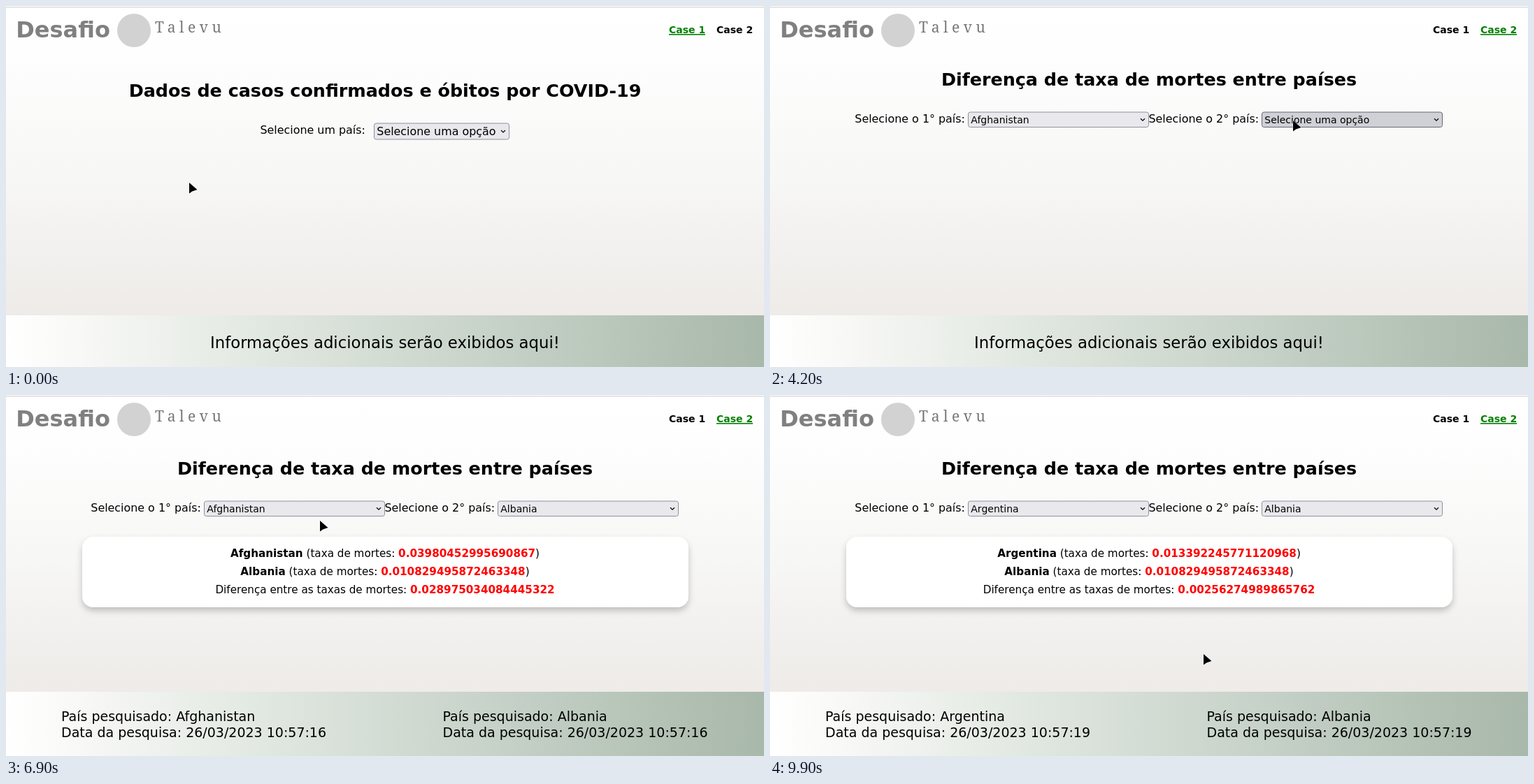
Write an HTML page that moves like this. It is 1084x517 px and loops after 10 s.

```html
<!DOCTYPE html>
<html lang="pt-BR">
<head>
<meta charset="utf-8">
<title>Desafio</title>
<style>
  html, body { margin: 0; width: 100%; height: 100%; overflow: hidden; background: #fff; }
  svg { display: block; width: 1084px; height: 517px; font-family: "DejaVu Sans", sans-serif; }
  text { white-space: pre; }
  .bold { font-weight: bold; }
  .mid { text-anchor: middle; }
  .rate { font-weight: bold; fill: #f00; }
  .title { font-weight: bold; font-size: 25.4px; text-anchor: middle; }
  .card text { font-size: 15.2px; text-anchor: middle; }
  .info { font-size: 19px; }
</style>
</head>
<body>
<svg id="stage" viewBox="0 0 1084 517">
  <defs>
    <linearGradient id="page" x1="0" y1="0" x2="0" y2="1">
      <stop offset="0" stop-color="#fff"/>
      <stop offset=".15" stop-color="#fefefe"/>
      <stop offset=".55" stop-color="#f7f7f6"/>
      <stop offset="1" stop-color="#eeebe8"/>
    </linearGradient>
    <linearGradient id="strip">
      <stop offset="0" stop-color="#fff"/>
      <stop offset=".1" stop-color="#f8f8f6"/>
      <stop offset=".35" stop-color="#e0e7e0"/>
      <stop offset="1" stop-color="#a8b8aa"/>
    </linearGradient>
    <filter id="soft" x="-10%" y="-30%" width="120%" height="180%">
      <feDropShadow dx="0" dy="5" stdDeviation="5" flood-color="#000" flood-opacity=".22"/>
    </filter>
  </defs>

  <rect id="main" width="1084" height="443" fill="url(#page)"/>
  <rect y="1" width="1084" height="1.5" fill="#dcdcdc"/>
  <text x="14.3" y="45" class="bold" font-size="32" fill="#808080">Desafio</text>
  <circle cx="183" cy="35" r="24" fill="#d2d2d2"/>
  <text x="213" y="38" font-size="21" letter-spacing="5.5" fill="#777" font-family="Noto Serif, serif">Talevu</text>
  <g class="bold" font-size="14">
    <text id="nav1" x="948" y="39">Case 1</text>
    <text id="nav2" x="1016" y="39">Case 2</text>
    <rect id="line" y="40" width="52" height="1.6" fill="green"/>
  </g>

  <g id="case1">
    <text class="title" x="542" y="130">Dados de casos confirmados e óbitos por COVID-19</text>
    <text x="363.5" y="183" font-size="15.9">Selecione um país:</text>
  </g>
  <g id="case2">
    <text class="title" x="542" y="114">Diferença de taxa de mortes entre países</text>
    <text x="121.3" y="167" font-size="15.9">Selecione o 1° país:</text>
    <text x="541.5" y="167" font-size="15.9">Selecione o 2° país:</text>
  </g>

  <g id="card" class="card">
    <rect x="109" y="203" width="867" height="101" rx="16" fill="#fff" filter="url(#soft)"/>
    <text x="542" y="232"><tspan id="name1" class="bold"></tspan> (taxa de mortes: <tspan id="rate1" class="rate"></tspan>)</text>
    <text x="542" y="258"><tspan class="bold">Albania</tspan> (taxa de mortes: <tspan class="rate">0.010829495872463348</tspan>)</text>
    <text x="542" y="284">Diferença entre as taxas de mortes: <tspan id="diff" class="rate"></tspan></text>
  </g>

  <rect id="foot" width="1084" height="92" fill="url(#strip)"/>
  <text id="hint" class="mid" x="542" y="490" font-size="22.8">Informações adicionais serão exibidos aqui!</text>
  <g id="info" class="info">
    <text id="land1" x="79" y="467"></text>
    <text id="date1" x="79" y="490"></text>
    <text x="624.5" y="467">País pesquisado: Albania</text>
    <text id="date2" x="624.5" y="490"></text>
  </g>

  <g id="boxes"></g>
  <g id="list"></g>
  <path id="arrow" d="M0 0V15.5L4.2 12.4L11.5 10Z" stroke="#fff" stroke-width="1" paint-order="stroke"/>
  <path id="beam" d="M-3 -7H-1L0 -6L1 -7H3M0 -6V5M-3 6H-1L0 5L1 6H3" fill="none" stroke="#000" stroke-width="1.4"/>
</svg>
<script>
const NS = "http://www.w3.org/2000/svg";
const $ = id => document.getElementById(id);
const show = (id, on) => $(id).setAttribute("display", on ? "inline" : "none");

function add(parent, tag, attrs, text = "") {
  const node = document.createElementNS(NS, tag);
  for (const key in attrs) node.setAttribute(key, attrs[key]);
  node.textContent = text;
  parent.appendChild(node);
  return node;
}

const EMPTY = "Selecione uma opção";
const LANDS = [EMPTY, "Afghanistan", "Albania", "Algeria", "Andorra", "Angola", "Antarctica",
  "Antigua and Barbuda", "Argentina", "Armenia", "Australia", "Austria", "Azerbaijan",
  "Bahamas", "Bahrain"];
const LOOP = 10000, STEP = 100, LIST_TOP = 174, ROW = 25;

function makeBox(x, y, w, h, size, base) {
  const g = add($("boxes"), "g", {});
  const rect = add(g, "rect", { x: x + .5, y: y + .5, width: w - 1, height: h - 1, rx: 3 });
  const label = add(g, "text", { x: x + 4.3, y: base, "font-size": size });
  const cx = x + w - 9, cy = y + h / 2;
  add(g, "path", { d: `M${cx - 3} ${cy - 1.5}l3 3l3 -3`, fill: "none", stroke: "#000", "stroke-width": 1.2 });
  return { g, x, y, w, h, rect, label };
}

function drawBox(box, on, value, hover) {
  box.g.setAttribute("display", on ? "inline" : "none");
  box.rect.setAttribute("fill", hover ? "#d0d0d7" : "#e9e9ed");
  box.rect.setAttribute("stroke", hover ? "#676774" : "#8f8f9d");
  box.label.textContent = value;
}

const single = makeBox(526, 167.5, 194, 24, 15.9, 185);
const first = makeBox(283, 151.5, 259, 22.5, 14, 168);
const second = makeBox(703, 151.5, 259, 22.5, 14, 168);

const listFrame = add($("list"), "rect", { y: LIST_TOP, width: 259, height: 360, fill: "#fff", stroke: "#c4c4cc" });
const rows = LANDS.slice(1).map((_, i) => {
  const y = LIST_TOP + i * ROW;
  return {
    rect: add($("list"), "rect", { y, width: 257, height: ROW, fill: "#3584e4" }),
    label: add($("list"), "text", { y: y + 17.5, "font-size": 14 })
  };
});

function drawList(box, names, active) {
  listFrame.setAttribute("x", box.x);
  rows.forEach(({ rect, label }, i) => {
    rect.setAttribute("x", box.x + 1);
    rect.setAttribute("fill-opacity", i === active ? 1 : 0);
    label.setAttribute("x", box.x + 6);
    label.setAttribute("fill", i === active ? "#fff" : "#000");
    label.textContent = names[i] || "";
  });
}

// pointer stops: time, x, y
const PATH = [
  [0, 262, 253], [1100, 1040, 32], [1200, 1040, 32], [1800, 726, 141], [2000, 726, 141],
  [2100, 715, 166], [2200, 440, 164], [2800, 440, 164], [3300, 421, 207], [3700, 421, 207],
  [4200, 748, 164], [4700, 748, 165], [5100, 743, 207], [5300, 743, 207], [5700, 663, 234],
  [6400, 952, 310], [6900, 449, 180], [7100, 449, 164], [7500, 449, 164], [8200, 448, 365],
  [8500, 448, 365], [9200, 571, 388], [9500, 571, 388], [9900, 620, 371], [LOOP, 620, 371]
];

function pointer(t) {
  const i = PATH.findIndex(p => p[0] > t);
  const [t0, x0, y0] = PATH[i - 1], [t1, x1, y1] = PATH[i];
  const k = (t - t0) / (t1 - t0);
  return { x: x0 + (x1 - x0) * k, y: y0 + (y1 - y0) * k };
}

function paint(now) {
  const t = Math.floor(now % LOOP / STEP) * STEP;
  const within = (a, b) => t >= a && t < b;
  const p = pointer(t);
  const over = b => p.x >= b.x && p.x < b.x + b.w && p.y >= b.y && p.y < b.y + b.h;

  const compare = t >= 1300, found = t >= 5500, fresh = t >= 8900;
  const land1 = t < 3500 ? EMPTY : t < 8500 ? "Afghanistan" : "Argentina";
  const land2 = t < 5400 ? EMPTY : "Albania";

  show("case1", !compare);
  show("case2", compare);
  $("nav1").setAttribute("fill", compare ? "#000" : "green");
  $("nav2").setAttribute("fill", compare ? "green" : "#000");
  $("line").setAttribute("x", compare ? 1016 : 948);

  const footTop = found ? 425 : 443;
  $("main").setAttribute("height", footTop);
  $("foot").setAttribute("y", footTop);
  show("hint", !found);
  show("info", found);
  $("land1").textContent = "País pesquisado: " + land1;
  $("date1").textContent = $("date2").textContent =
    "Data da pesquisa: 26/03/2023 10:57:" + (fresh ? 19 : 16);

  show("card", t >= 6200);
  $("name1").textContent = land1;
  $("rate1").textContent = fresh ? "0.013392245771120968" : "0.03980452995690867";
  $("diff").textContent = fresh ? "0.00256274989865762" : "0.028975034084445322";

  const open1 = within(2700, 3500) || within(7300, 8500), open2 = within(4600, 5400);
  drawBox(single, !compare, EMPTY, over(single));
  drawBox(first, compare, land1, over(first) || open1);
  drawBox(second, compare, land2, over(second) || open2);

  show("list", open1 || open2);
  if (open1 || open2) {
    const taken = open2 ? land1 : land2;
    const names = LANDS.filter(n => n === EMPTY || n !== taken);
    const chosen = names.indexOf(open2 ? land2 : land1);
    const row = Math.floor((p.y - LIST_TOP) / ROW);
    drawList(open2 ? second : first, names, row < 0 ? chosen : row);
  }

  const typing = within(5600, 5900);
  show("arrow", !typing);
  show("beam", typing);
  for (const id of ["arrow", "beam"]) $(id).setAttribute("transform", `translate(${p.x} ${p.y})`);
}

function tick() {
  paint(performance.now());
  requestAnimationFrame(tick);
}
tick();
</script>
</body>
</html>
```
